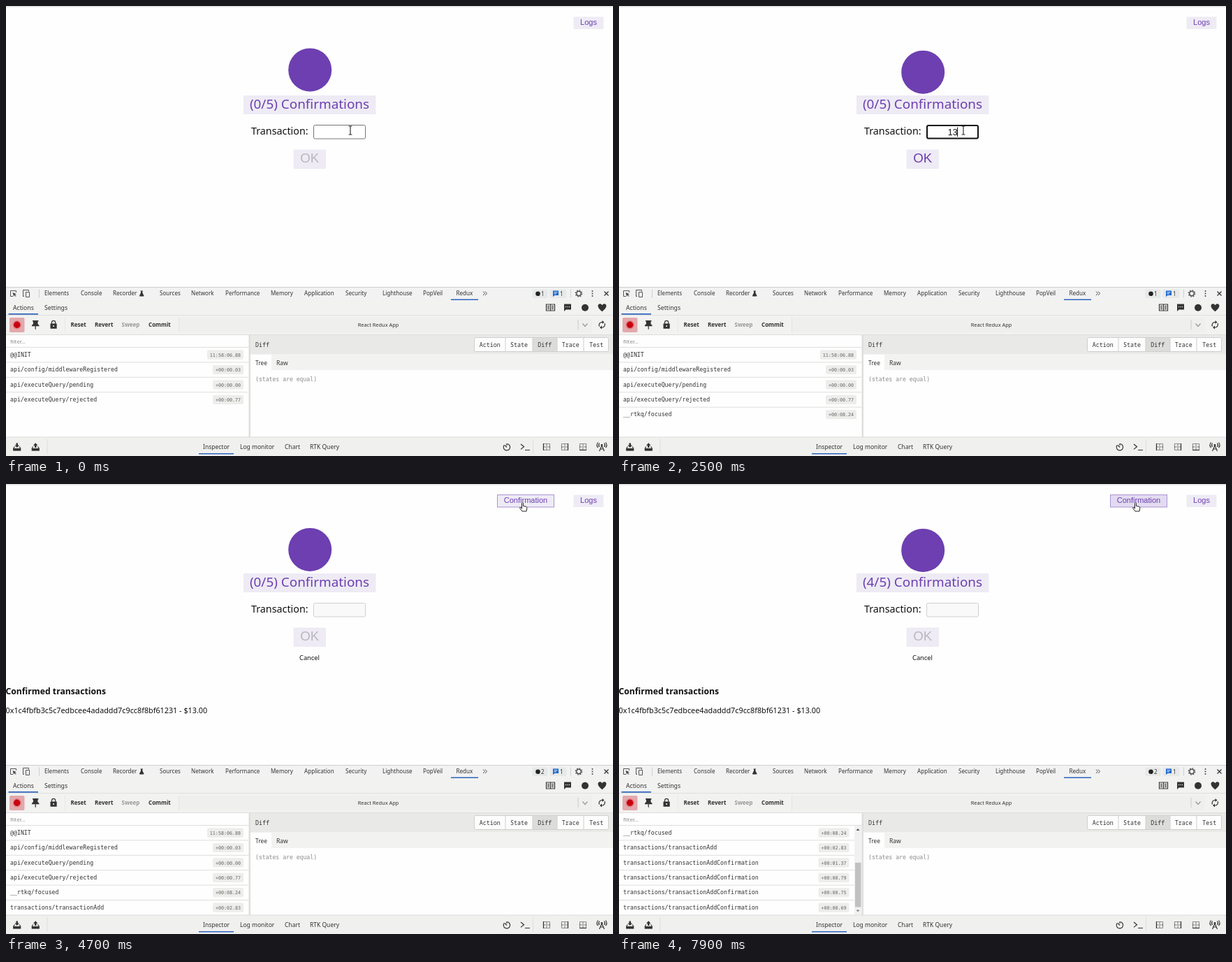
Write an HTML page that moves like this. It is 869x644 px and loops after 8000 ms.

```html
<!DOCTYPE html>
<html lang="en">
<head>
<meta charset="utf-8">
<title>Transaction confirmations</title>
<style>
html, body { margin: 0; width: 100%; height: 100%; overflow: hidden; background: #fefefe; }
svg { display: block; width: 869px; height: 644px; }
text { font-family: "Noto Sans", "Open Sans", sans-serif; fill: #333; white-space: pre; }
.ui { font-family: "Liberation Sans", Arial, sans-serif; }
.mono { font-family: "DejaVu Sans Mono", monospace; }
.code { font-family: "Noto Sans Mono", "DejaVu Sans Mono", monospace; }
.bold { font-weight: 600; }
.mid { text-anchor: middle; }
.icon { fill: none; stroke: #333; stroke-width: 1.2; }
</style>
</head>
<body>
<svg id="stage" viewBox="0 0 869 644" xmlns="http://www.w3.org/2000/svg"></svg>
<script>
const LOOP = 8000, STEP = 100;
const FOCUS = 800, TYPE_ONE = 2100, TYPE_TWO = 2300, SUBMIT = 3600;
const CONFIRMS = [5000, 5800, 6500, 7200, 8000];
const PURPLE = '#6d3fb0', LILAC = '#eeebf5', BLUE = '#2d63bd';
const LIST_TOP = 488.5, ROW = 21.4;

const rect = (x, y, w, h, fill, extra = '') =>
  `<rect x="${x}" y="${y}" width="${w}" height="${h}" fill="${fill}" ${extra}/>`;
const text = (x, y, size, str, cls = '', extra = '') =>
  `<text x="${x}" y="${y}" font-size="${size}" class="${cls}" ${extra}>${str}</text>`;
const circle = (x, y, r, fill, extra = '') =>
  `<circle cx="${x}" cy="${y}" r="${r}" fill="${fill}" ${extra}/>`;
const path = (d, extra = '') => `<path d="${d}" class="icon" ${extra}/>`;
const solid = (d, fill = '#333') => `<path d="${d}" fill="${fill}"/>`;
const at = (x, y, body) => `<g transform="translate(${x} ${y})">${body}</g>`;
const fill = color => `style="fill:${color}"`;

function tabBar() {
  const tabs = [['Elements', 55], ['Console', 107], ['Recorder', 153], ['Sources', 220], ['Network', 265],
    ['Performance', 314], ['Memory', 379], ['Application', 427], ['Security', 486],
    ['Lighthouse', 539], ['PopVeil', 597], ['Redux', 644.5]];
  const thin = 'style="stroke:#555;stroke-width:1"';
  return rect(0, 402, 869, 19, '#f1f2f1') + rect(0, 402, 869, 1, '#cfcfcf') +
    tabs.map(([label, x]) => text(x, 414.2, 8.1, label)).join('') +
    rect(637, 419.5, 39, 1.5, BLUE) +
    path('M10 415.500H6.500V407.500H14.500V410', thin) + solid('M9.500 410l5.500 2.200-2.300.8 2 2-.8.8-2-2-.8 2.200z', '#444') +
    path('M26 415.500H24.500V406.500H32.500V408.500M28.500 409.500H33.500V416.500H28.500Z', thin) +
    solid('M192.500 407.500h3.500v.8h-.6v2.200l2 4q.3 1-.7 1h-5q-1 0-.7-1l2-4v-2.200h-.5z') +
    path('M683 408.500l2.500 2.800-2.500 2.800M686 408.500l2.500 2.800-2.500 2.800', thin) +
    rect(47, 405.5, 1, 12, '#cfcfcf') + rect(808, 405.5, 1, 12, '#cfcfcf') +
    rect(753.5, 405.5, 22, 12.5, '#e7e9e9', 'rx="2"') + circle(761.5, 411.7, 3.3, '#222') +
    text(766, 414.5, 8, '1', '', 'id="errors"') +
    rect(778.5, 405.5, 24, 12.5, '#e7e9e9', 'rx="2"') +
    solid('M783 407.500h8v6.500h-5.500l-2.500 2z', '#1a66cc') + rect(784.5, 409.3, 5, .9, '#fff') +
    rect(784.5, 411.4, 3.5, .9, '#fff') + text(793, 414.5, 8, '1') +
    circle(820, 411.5, 3.2, 'none', 'stroke="#555" stroke-width="1.4"') +
    circle(820, 411.5, 4.6, 'none', 'stroke="#555" stroke-width="1.4" stroke-dasharray="1.8 1.81"') +
    [408, 411.5, 415].map(y => circle(839.5, y, 1, '#444')).join('') +
    path('M856.500 408.500l6 6M862.500 408.500l-6 6');
}

function toolBars() {
  const commands = [['Reset', 92.5], ['Revert', 127], ['Sweep', 165.5], ['Commit', 204]];
  return rect(0, 421, 869, 50, '#f2f2f1') +
    rect(0, 442, 869, 1, '#e0e0de') + rect(0, 470, 869, 1, '#dededc') +
    text(10, 434.8, 8.7, 'Actions') + text(55, 434.8, 8.7, 'Settings') + rect(3.5, 440, 42.5, 1.7, BLUE) +
    path('M773.500 427H779.500V436H773.500ZM779.500 427H785.500V436H779.500ZM775 429.500h3M775 431.500h3M775 433.500h3M781 429.500h3M781 431.500h3M781 433.500h3', 'stroke-width="1"') +
    solid('M799 426.500h10v8h-7.500l-2.500 2.500z') +
    [801.5, 804, 806.5].map(x => circle(x, 430.5, .7, '#f2f2f1')).join('') +
    circle(829, 431.7, 5, '#333') +
    solid('M853.500 437.200C844 430 848 425.500 851 426.300q1.800.4 2.500 1.900q.7-1.500 2.500-1.900C859 425.500 863 430 853.500 437.200z') +
    rect(5, 446, 21.500, 21, '#e3a9ac', 'rx="2"') + circle(15.7, 456.3, 6.3, '#dd868c') + circle(15.7, 456.3, 4.7, '#c8000f') +
    solid('M38 450h8.500v1.500h-1v3.500l2 2v1.300h-4.700v4l-.6 1-.6-1v-4h-4.700V457l2-2v-3.500h-.9z') +
    solid('M63.500 454.500h9.200v7.300h-9.200z') + path('M65.500 455V453a2.600 2.600 0 0 1 5.200 0V455') + circle(68.1, 458, 1.1, '#f2f2f1') +
    commands.map(([label, x]) => text(x, 459, 8.050, label, 'bold', label === 'Sweep' ? fill('#999') : '')).join('') +
    rect(84, 446, 1, 21, '#e9e9e7') + rect(247, 446, 592, 21, '#efefed') + rect(247, 446, 1, 21, '#e4e4e2') +
    text(533, 459, 7.4, 'React Redux App', 'mid') +
    rect(818.5, 449, 1, 14, '#ccc') + path('M825.500 454.500l3.500 4 3.500-4', 'style="stroke:#999"') +
    path('M849.500 458.500a4.200 4.200 0 0 1 3-6h2M857 454a4.200 4.200 0 0 1-3 6h-2') +
    solid('M853.500 450l3 2.500-3 2.500zM853 457.500l-3 2.500 3 2.500z');
}

function inspector() {
  const modes = [['Action', 692.7, 671], ['State', 734.5, 715], ['Diff', 771.3, 754], ['Trace', 808.3, 789], ['Test', 845.2, 827]];
  return rect(347.5, 471, 2.5, 146, '#dededc') + rect(350, 471, 519, 27.5, '#e9e9e7') +
    text(357, 487.500, 8.300, 'Diff', 'code') +
    rect(670.5, 474.5, 192, 20, '#fdfdfd', 'stroke="#cfcfcd" rx="2"') +
    rect(754, 475, 35, 19, '#dcdcda') +
    modes.map(([label, x, left], i) => text(x, 487.500, 8.300, label, 'code mid') +
      (i ? rect(left - .5, 475, 1, 19, '#cfcfcd') : '')).join('') +
    rect(350, 498.5, 519, 22.5, '#f2f2f1') + rect(350, 499, 30, 22.5, '#fefefe') +
    text(357, 513.500, 8.3, 'Tree') + text(387, 513.500, 8.5, 'Raw') +
    text(357, 537.200, 8.150, '(states are equal)', 'mono', fill('#8c8c8c'));
}

function bottomBar() {
  const tray = path('M12.500 630.500L10.800 633V636H20.700V633L19 630.500') + rect(10.5, 633, 10.5, 3.2, '#333');
  const panel = (x, lines) =>
    path(`M${x} 626.500h9v9h-9zM${x + 4.5} 626.500v9M${x} 631h9`, 'stroke-width="1" stroke-dasharray="1 1"') +
    path(lines, 'stroke-width="1.2"');
  return rect(0, 617, 869, 27, '#f0f0ef') + rect(0, 616.500, 869, 1, '#dededc') +
    tray + solid('M14.500 625.500h2.500v3h2l-3.200 3.500-3.300-3.500h2z') +
    at(26.5, 0, tray + solid('M14.500 632h2.500V629h2l-3.200-3.700-3.300 3.700h2z')) +
    rect(58.5, 620, 1, 21, '#dededc') + rect(754, 620, 1, 21, '#dededc') +
    [['Inspector', 282], ['Log monitor', 335], ['Chart', 399], ['RTK Query', 435]]
      .map(([label, x]) => text(x, 634.2, 8.5, label)).join('') +
    rect(276, 640, 50, 1.5, BLUE) +
    path('M717 626.500a4.700 4.700 0 1 1-3.800 1.800M717 626v3M717 631.500l-3-3') +
    path('M737 627l4.500 3.700-4.500 3.700M743 635.500h7', 'stroke-width="1.6"') +
    panel(769.5, 'M769.500 626v10') + panel(795.5, 'M804.500 626v10') + panel(821.5, 'M821 635.500h10') +
    path('M849.500 637l3.500-8 3.500 8M850.800 634h4.500M849.500 625.500q-2 3 0 5.500M856.500 625.500q2 3 0 5.500M847.500 624.500q-3 4 0 7.500M858.500 624.500q3 4 0 7.500', 'stroke-width="1"') +
    circle(853, 628.3, 1.4, '#333');
}

const button = (id, x, y, w, h, label, size, baseline) =>
  `<g id="${id}">${rect(x + .5, y + .5, w - 1, h - 1, LILAC)}${text(x + w / 2, baseline, size, label, 'ui mid', fill(PURPLE))}</g>`;

const pointers = {
  beam: path('M-2.500-6h2l.5.8.5-.8h2M-2.500 6h2l.5-.8.5.8h2M0-5.500V5.500', 'stroke-width="1"'),
  arrow: '<path d="M0 0V11.500l2.700-2.500 2 4.600 2-.9-2-4.400h3.600z" fill="#222" stroke="#fff" stroke-width=".6"/>',
  hand: '<path d="M-1 1q1-1.800 2 0v4l4 .8q1.500.4 1.300 2.200l-.8 4.500h-6L-4 8q0-1.500 1.500-.8L-1 8.500z" fill="#fff" stroke="#222" stroke-width="1"/>'
};

const stage = document.getElementById('stage');
stage.innerHTML = rect(0, 0, 869, 644, '#fefefe') + rect(0, 0, 869, 1.5, '#dedede') +
  circle(435.2, 92, 31, PURPLE, 'id="logo"') +
  rect(340, 128, 189.5, 27, LILAC) +
  text(434.5, 147, 18.9, '', 'mid', `id="count" ${fill(PURPLE)}`) +
  text(351, 184, 14.3, 'Transaction:', '', fill('#111')) +
  '<rect id="field" rx="2"/>' +
  text(477.7, 184.500, 12.4, '', 'ui mid', `id="value" ${fill('#111')}`) +
  rect(477, 173.5, 1, 13.5, '#111', 'id="caret"') +
  button('ok', 411, 205, 47.5, 28.5, 'OK', 18.7, 224) +
  button('logs', 812, 15, 44, 18.5, 'Logs', 11.1, 27) +
  button('confirm', 703, 15, 82, 18.5, 'Confirmation', 11, 27) +
  `<g id="done">${text(434.5, 251.500, 9.3, 'Cancel', 'mid', fill('#111'))}${
    text(-.5, 300.700, 12.2, 'Confirmed transactions', '', `font-weight="700" ${fill('#111')}`)}${
    text(-.5, 327.700, 10.8, '0x1c4fbfb3c5c7edbcee4adaddd7c9cc8f8bf61231 - $13.00', '', fill('#111'))}</g>` +
  tabBar() + toolBars() + text(6, 482.500, 7.7, 'filter...', '', fill('#8a8a8a')) +
  rect(0, 488, 347.5, 1, '#dededc') + '<g id="list"></g>' + inspector() + bottomBar() +
  Object.entries(pointers).map(([id, body]) => `<g id="${id}">${body}</g>`).join('');

const $ = id => document.getElementById(id);
const show = (id, on) => $(id).setAttribute('display', on ? 'inline' : 'none');
const set = (node, attrs) => Object.entries(attrs).forEach(([key, val]) => node.setAttribute(key, val));

const baseLog = [['@@INIT', '11:58:06.88'], ['api/config/middlewareRegistered', '+00:00.03'],
  ['api/executeQuery/pending', '+00:00.00'], ['api/executeQuery/rejected', '+00:00.77']];
const delays = ['01.37', '00.79', '00.75', '00.69'];

function drawList(t, confirmed) {
  const log = [...baseLog];
  if (t >= FOCUS) log.push(['__rtkq/focused', '+00:08.24']);
  if (t >= SUBMIT) log.push(['transactions/transactionAdd', '+00:02.83']);
  delays.slice(0, confirmed).forEach(d => log.push(['transactions/transactionAddConfirmation', '+00:' + d]));

  const scrolls = log.length > 6, right = scrolls ? 329.5 : 340;
  let out = log.slice(-6).map(([name, stamp], i, rows) => {
    const y = LIST_TOP + i * ROW, w = stamp.length * 4.05 + 7.500;
    return text(6, y + 13.3, 8.25, name, 'mono') +
      rect(right - w, y + 4, w, 13.2, '#ededeb', 'rx="2"') +
      text(right - w / 2, y + 13.2, 6.7, stamp, 'mono mid', fill('#666')) +
      (i < rows.length - 1 ? rect(0, y + ROW - .5, scrolls ? 337 : 347.5, 1, '#dededc') : '');
  }).join('');
  if (scrolls) {
    const thumb = 106 * 6 / log.length;
    out += rect(337, 489, 10.5, 127.5, '#f1f1f1') + rect(338, 605.5 - thumb, 8.5, thumb, '#c1c1c1') +
      solid('M339.500 496l2.500-3 2.500 3z', '#555') + solid('M339.500 609.500l2.500 3 2.500-3z', '#8a8a8a');
  }
  $('list').innerHTML = out;
}

const route = [[2700, 493, 178], [3200, 467, 208], [3400, 441, 222], [3700, 441, 222], [4500, 738, 45], [4600, 739.5, 26.5]];
function pointerAt(t) {
  if (t <= route[0][0]) return route[0].slice(1);
  const i = route.findIndex(stop => stop[0] >= t);
  if (i < 0) return route[route.length - 1].slice(1);
  const [t0, x0, y0] = route[i - 1], [t1, x1, y1] = route[i];
  const s = (t - t0) / (t1 - t0), k = s * s * (3 - 2 * s);
  return [x0 + (x1 - x0) * k, y0 + (y1 - y0) * k];
}

function styleButton(id, hover, pressed, enabled = true) {
  const [box, label] = $(id).children;
  set(box, { fill: pressed ? '#e2dbf0' : LILAC, stroke: hover ? '#ad93d6' : 'none' });
  label.style.fill = enabled ? PURPLE : '#b9b8be';
}

function update(t) {
  const confirmed = CONFIRMS.filter(c => c <= t).length;
  const submitted = t >= SUBMIT, focused = t >= FOCUS && !submitted;
  const value = submitted || t < TYPE_ONE ? '' : t < TYPE_TWO ? '1' : '13';

  $('logo').setAttribute('cy', 92 - 3.5 * Math.cos(2 * Math.PI * (t - 670) / 3000));
  $('count').textContent = `(${confirmed}/5) Confirmations`;
  $('value').textContent = value;
  $('errors').textContent = submitted ? 2 : 1;
  const line = focused ? 2 : 1;
  set($('field'), {
    x: 440 + line / 2, y: 170 + line / 2, width: 75 - line, height: 20.5 - line,
    fill: submitted ? '#f9f9f9' : '#fff',
    stroke: submitted ? '#d0d0d0' : focused ? '#111' : '#767676',
    'stroke-width': line
  });

  const blinkStart = t >= TYPE_TWO ? TYPE_TWO : t >= TYPE_ONE ? TYPE_ONE : FOCUS;
  show('caret', focused && (t - blinkStart) % 1000 < 500);
  $('caret').setAttribute('x', 477 + value.length * 3.5);

  const [x, y] = pointerAt(t);
  const overField = x > 440 && x < 515 && y > 170 && y < 190;
  const overOk = value !== '' && x > 411 && x < 458 && y > 205 && y < 233;
  const overConfirm = t >= 4600;
  const kind = overField ? 'beam' : overOk || overConfirm ? 'hand' : 'arrow';
  for (const id in pointers) show(id, id === kind);
  $(kind).setAttribute('transform', `translate(${x} ${y})`);

  styleButton('ok', overOk, overOk && t >= SUBMIT - STEP, value !== '');
  styleButton('confirm', overConfirm, CONFIRMS.some(c => t >= c - STEP && t < c));
  show('confirm', submitted);
  show('done', submitted);
  drawList(t, confirmed);
}

const start = performance.now();
let last = -1;
function frame() {
  const t = Math.floor((performance.now() - start) % LOOP / STEP) * STEP;
  if (t !== last) update(last = t);
  requestAnimationFrame(frame);
}
frame();
</script>
</body>
</html>
```
